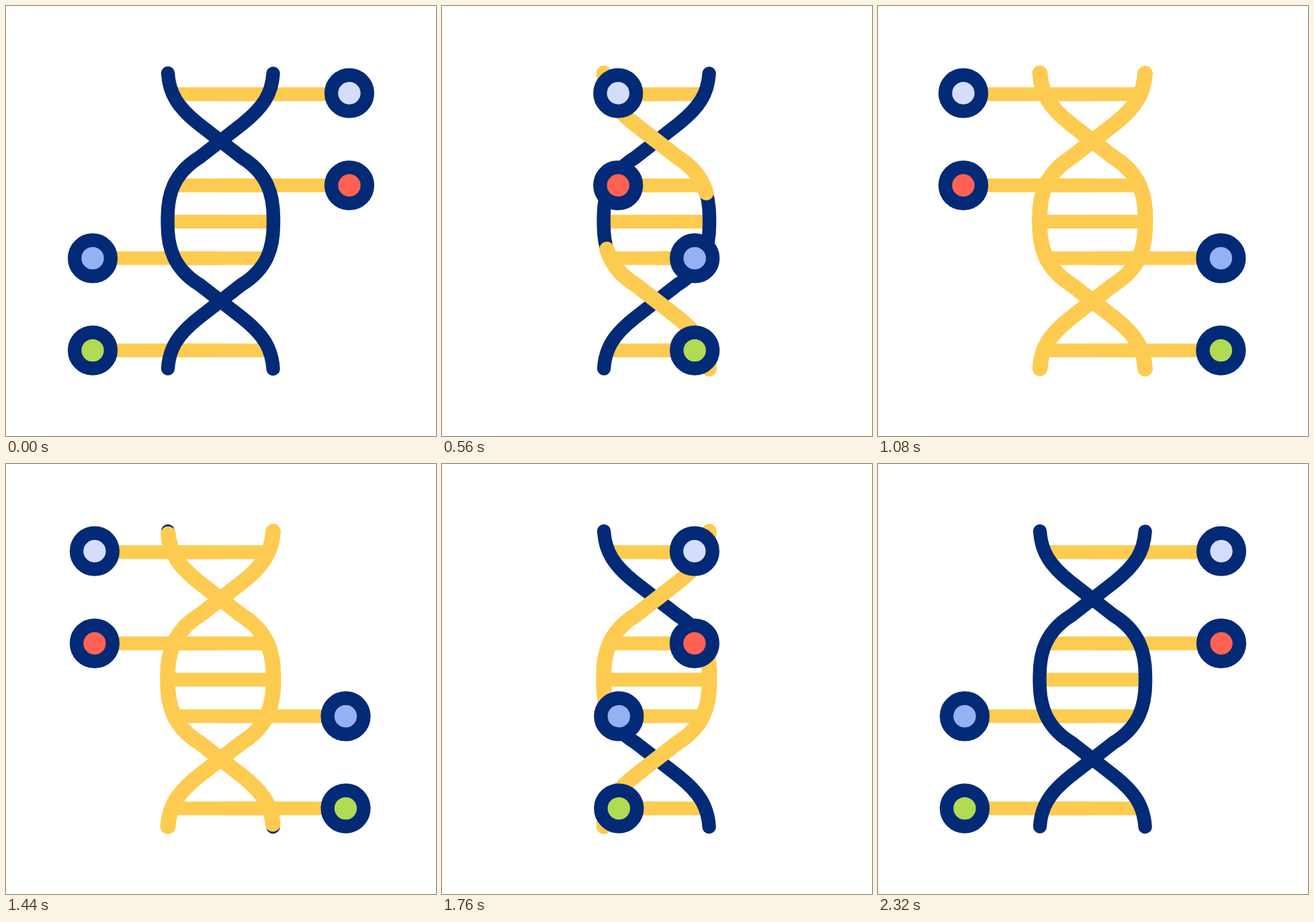
Animation, 640 px wide and 640 px high, one loop 2.4 s. Source, as an HTML page:

```html
<!DOCTYPE html>
<html lang="en">
<head>
<meta charset="utf-8">
<title>DNA helix</title>
<style>
  html, body { margin: 0; width: 100%; height: 100%; overflow: hidden; background: #fff; }
  svg { display: block; width: 100%; height: 100%; }
  path, line { fill: none; }
  line { stroke: #fdcb50; stroke-width: 20.4; }
  .base { stroke: #032a76; stroke-width: 20.4; stroke-linecap: round; }
  .trim { stroke: #fdcb50; stroke-width: 22.8; stroke-linecap: round; }
  circle { stroke: #032a76; stroke-width: 20.4; }
</style>
</head>
<body>
<svg viewBox="0 0 640 640">
  <defs>
    <path id="strand" pathLength="1" d="M241 100C243 131 256 151 286 175L351 225.5C389 249 398 281 398 315V325
      C398 359 389 391 351 414.5L286 465C256 489 243 509 241 539.5"/>
  </defs>
  <g id="bars"><line x1="241" y1="321" x2="398" y2="321"/></g>
  <g class="base">
    <use href="#strand"/>
    <use href="#strand" transform="rotate(180 319.3 320)"/>
  </g>
  <g class="trim" id="trim">
    <use href="#strand"/>
    <use href="#strand" transform="rotate(180 319.3 320)"/>
  </g>
  <g id="nodes"></g>
</svg>
<script>
  const LOOP = 2400, STEP = 40, MID = 319.3;
  const $ = id => document.getElementById(id);

  function add(parent, tag, attrs) {
    const el = document.createElementNS('http://www.w3.org/2000/svg', tag);
    for (const k in attrs) el.setAttribute(k, attrs[k]);
    return parent.appendChild(el);
  }

  // circle y, bar y, start x, far x, fill
  const nodes = [
    [129.7, 131.2, 511, 127, '#d4defc'],
    [267, 267, 511, 127, '#ff6252'],
    [375.4, 375.4, 129, 510.4, '#94b1f3'],
    [512.6, 512.6, 129, 510.4, '#b1db52']
  ].map(([cy, y, from, to, fill]) => {
    add($('bars'), 'line', { x1: 250, x2: 389, y1: y, y2: y });
    return {
      from, to,
      arm: add($('bars'), 'line', { x1: MID, y1: y, y2: y }),
      dot: add($('nodes'), 'circle', { cy, r: 26.9, fill })
    };
  });

  function ease(t, start, length) {
    const u = Math.min(1, Math.max(0, (t - start) / length));
    return u * u * (3 - 2 * u);
  }

  function draw(now) {
    // the motion advances at 25 steps per second
    const t = Math.floor((now + 4) / STEP) * STEP % LOOP;

    const swing = ease(t, 200, 600) - ease(t, 1400, 600);
    for (const { from, to, arm, dot } of nodes) {
      const x = from + (to - from) * swing;
      arm.setAttribute('x2', x);
      dot.setAttribute('cx', x);
    }

    const head = ease(t, 200, 800), tail = ease(t, 1400, 800);
    const trim = $('trim').style;
    trim.display = head > tail ? '' : 'none';
    trim.strokeDasharray = `${head - tail} 2`;
    trim.strokeDashoffset = -tail;

    requestAnimationFrame(draw);
  }
  draw(0);
</script>
</body>
</html>
```
